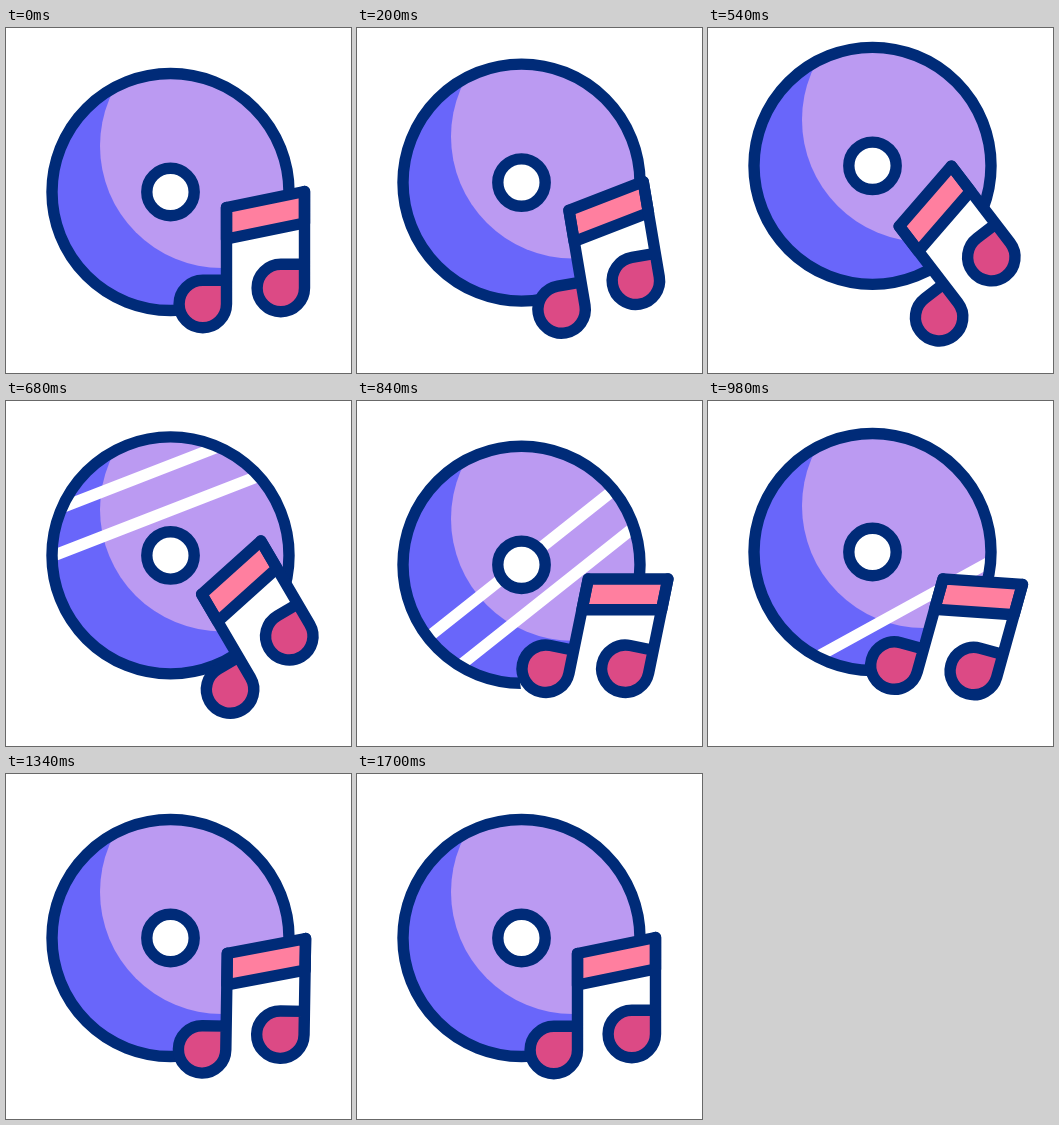
Recreate the animation shown at these times as an HTML page. Size 345 by 345 pixels, loop 2 s.

```html
<!DOCTYPE html>
<html lang="en">
<head>
<meta charset="utf-8">
<title>Disc and note</title>
<style>
html, body { margin: 0; height: 100%; overflow: hidden; background: #fff; }
svg { display: block; width: 100%; height: 100%; }
.line { stroke: #002b78; stroke-width: 11.4; stroke-linejoin: round; stroke-linecap: round; }
</style>
</head>
<body>
<svg viewBox="0 0 345 345">
  <clipPath id="face"><circle cx="164.5" cy="164" r="118.5"/></clipPath>
  <g id="disc">
    <g clip-path="url(#face)">
      <path fill="#6966fa" d="M40 40h250v250H40z"/>
      <circle cx="216" cy="118" r="122" fill="#bb9af2"/>
      <path id="shine" stroke="#fff" stroke-width="11.5" d="M-150 0H150M-150 42H150"/>
    </g>
    <circle class="line" cx="164.5" cy="164" r="118.5" fill="none"/>
    <circle class="line" cx="164.5" cy="164" r="23.7" fill="#fff"/>
  </g>
  <g id="note">
    <!-- white backing hides the disc behind the note -->
    <path fill="#fff" d="M220.5 179.5L298.5 163.5V260L275 289L196.5 305L177 302L168 276L196.5 252.5H220.5z"/>
    <path class="line" fill="#ff7f9f" d="M220.5 179.5L298.5 163.5V195L220.5 211z"/>
    <g class="line" fill="#dc4a85">
      <path d="M220.5 179.5V276a23.7 23.7 0 1 1-23.7-23.7h23.7"/>
      <path d="M298.5 163.5V260a23.7 23.7 0 1 1-23.7-23.7h23.7"/>
    </g>
  </g>
</svg>
<script>
const LOOP = 2000;
// [time, value] pairs, eased in and out between neighbours
const lift = [[55, 0], [446, -30.7], [824, 0], [1082, -19.5], [1330, 0]];
const swing = [[0, 0], [605, -38.5], [916, 19.5], [1190, -10.5], [1420, 5], [1690, 0]];
const tilt = [[560, 11], [850, 38.5], [1100, 20.5]];

function at(keys, t) {
  if (t <= keys[0][0]) return keys[0][1];
  for (let i = 1; i < keys.length; i++) {
    const [t0, a] = keys[i - 1], [t1, b] = keys[i];
    if (t < t1) return a + (b - a) * (1 - Math.cos(Math.PI * (t - t0) / (t1 - t0))) / 2;
  }
  return keys[keys.length - 1][1];
}

const [disc, shine, note] = ["disc", "shine", "note"].map(id => document.getElementById(id));
const move = (el, value) => el.setAttribute("transform", value);

function draw(now) {
  const t = now % LOOP;
  const u = Math.min(Math.max(t, 500), 1200) - 840;
  const sweep = -1.8 + 0.495 * u - 0.00014 * u * u;
  move(disc, `translate(0 ${at(lift, t)})`);
  move(shine, `translate(164.5 164) rotate(${-at(tilt, t)}) translate(0 ${sweep})`);
  move(note, `rotate(${at(swing, t)} 233.5 232)`);
}

const start = performance.now();
function tick() {
  draw(performance.now() - start);
  requestAnimationFrame(tick);
}
tick();
</script>
</body>
</html>
```
